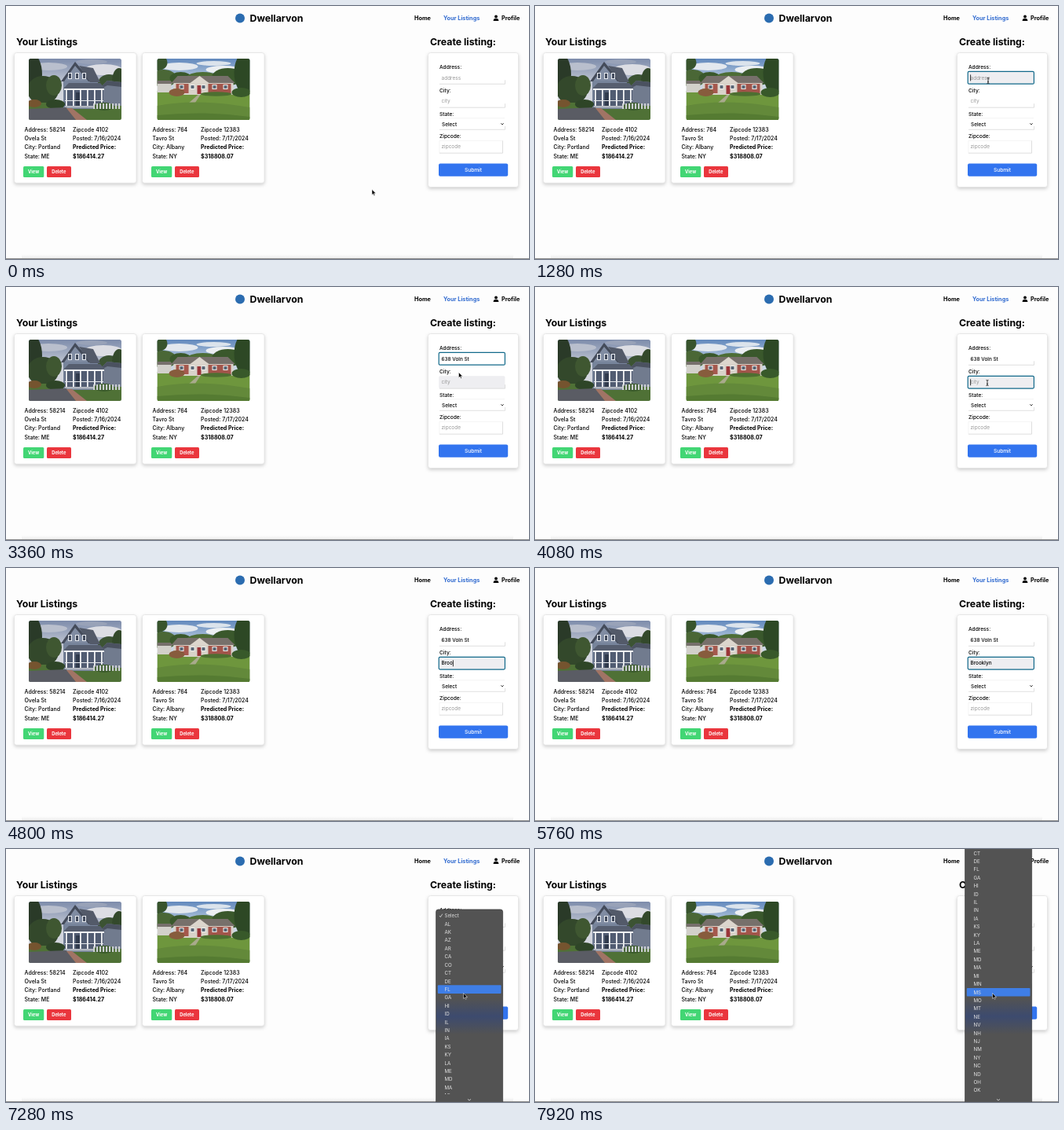
Recreate the animation shown at these times as an HTML page. Size 666x322 px, loop 8000 ms.

```html
<!DOCTYPE html>
<html lang="en">
<head>
<meta charset="utf-8">
<title>Property listings</title>
<style>
html, body { margin: 0; width: 100%; height: 100%; overflow: hidden; background: #fdfdfd; }
svg { display: block; width: 666px; height: 322px; font-family: Inter, Roboto, sans-serif; }
text { white-space: pre; }
.title { font-size: 12.3px; font-weight: 700; }
.nav { font-size: 7.3px; font-weight: 700; }
.body { font-size: 7px; font-weight: 500; }
.bold { font-size: 7.1px; font-weight: 700; }
.btn { font-size: 5.8px; font-weight: 700; fill: #fff; text-anchor: middle; }
.form { font-size: 6.6px; font-weight: 500; }
.field { font-size: 6.4px; font-weight: 500; }
.hint { font-size: 6.5px; fill: #999; }
.menu { font-size: 6.2px; fill: #e2e2e2; }
.card { fill: #fff; stroke: #e2e2e2; stroke-width: .8; filter: drop-shadow(0 2px 2px #0000002e); }
</style>
</head>
<body>
<svg viewBox="0 0 666 322">
  <defs>
    <clipPath id="frame"><rect width="118" height="78" rx="2.5"/></clipPath>
    <clipPath id="listClip"><rect x="547" width="86" height="312"/></clipPath>
    <linearGradient id="fade" x2="0" y2="1">
      <stop offset="0" stop-color="#000" stop-opacity="0"/>
      <stop offset="1" stop-color="#000" stop-opacity=".06"/>
    </linearGradient>
    <linearGradient id="tint" x2="0" y2="1">
      <stop offset="0" stop-color="#33477a" stop-opacity="0"/>
      <stop offset=".5" stop-color="#33477a" stop-opacity=".7"/>
      <stop offset="1" stop-color="#33477a" stop-opacity="0"/>
    </linearGradient>
    <linearGradient id="sky1" x2="0" y2="1">
      <stop offset="0" stop-color="#7d8cab"/><stop offset=".5" stop-color="#d3d6de"/>
    </linearGradient>
    <linearGradient id="sky2" x2="0" y2="1">
      <stop offset="0" stop-color="#6289bd"/><stop offset=".4" stop-color="#c9d6e4"/>
    </linearGradient>
  </defs>

  <rect width="666" height="322" fill="#fdfdfd"/>
  <rect x="20" y="316" width="626" height="5" fill="url(#fade)"/>
  <rect y="321" width="666" height="1" fill="#8c8c8c"/>

  <circle cx="298" cy="15.5" r="6" fill="#2b6cb0"/>
  <text class="title" x="310.5" y="19.8">Dwellarvon</text>
  <text class="nav" x="520" y="18">Home</text>
  <text class="nav" x="557" y="18" fill="#316bd0">Your Listings</text>
  <circle cx="624" cy="13.5" r="1.9"/>
  <path d="M620.7 19v-.8q0-2.2 2.2-2.2h2.2q2.2 0 2.2 2.2v.8z"/>
  <text class="nav" x="631" y="18">Profile</text>
  <text class="title" x="13" y="49.7">Your Listings</text>
  <text class="title" x="540" y="49.7">Create listing:</text>

  <g id="cards"></g>

  <rect class="card" x="537.5" y="59.5" width="115" height="171" rx="3"/>
  <g class="form">
    <text x="552" y="80.4">Address:</text>
    <text x="552" y="110.3">City:</text>
    <text x="552" y="139.9">State:</text>
    <text x="552" y="168">Zipcode:</text>
  </g>
  <g id="fields"></g>
  <path d="M552 157.3H635.5V153" fill="none" stroke="#d4d4d4" stroke-width=".7"/>
  <path d="M552 142.7H635" stroke="#ececec" stroke-width=".6"/>
  <text class="field" x="555" y="152.5">Select</text>
  <path d="M630.3 149.3l1.7 1.7 1.7-1.7" fill="none" stroke="#222" stroke-width=".9"/>
  <path d="M552 187.2V171.4H632" fill="none" stroke="#ececec" stroke-width=".6"/>
  <path d="M552 187.2H632.5V171.4" fill="none" stroke="#d0d0d0" stroke-width=".7"/>
  <text class="hint" x="554.5" y="181.3">zipcode</text>
  <rect x="551" y="200.5" width="88.2" height="16.2" rx="2" fill="#3274ef"/>
  <text class="form" x="595" y="211.1" fill="#fff" text-anchor="middle">Submit</text>

  <g id="menu">
    <path id="panel" fill="#535353" stroke="#3a3a3a" stroke-width=".7"/>
    <rect x="548" y="190" width="84.5" height="46" fill="url(#tint)"/>
    <rect id="mark" x="549.8" width="80.7" height="10.6" rx="1" fill="#3f7ee6"/>
    <g clip-path="url(#listClip)"><g id="list" class="menu"></g></g>
    <path d="M588 318.3l2 1.8 2-1.8" fill="none" stroke="#e2e2e2" stroke-width=".8"/>
  </g>

  <path id="arrow" d="M0 0V6.9L1.6 5.4 2.7 7.9 3.8 7.4 2.8 5H5z" fill="#000" stroke="#fff" stroke-width=".5"/>
  <path id="beam" d="M-1.5-3.6Q0-3.6 0-2.6V2.6Q0 3.6-1.5 3.6M1.5-3.6Q0-3.6 0-2.6M0 2.6Q0 3.6 1.5 3.6M-.9 1.3H.9" fill="none" stroke="#111" stroke-width=".8"/>
</svg>

<script>
const $ = id => document.getElementById(id);
const show = (el, on) => el.setAttribute('visibility', on ? 'visible' : 'hidden');
const clamp = v => Math.max(0, Math.min(1, v));
const ease = v => (v = clamp(v), v * v * (3 - 2 * v));

const row = (n, f) => Array.from({ length: n }, (_, i) => f(i)).join('');
const blob = (x, y, rx, ry, c) => `<ellipse cx="${x}" cy="${y}" rx="${rx}" ry="${ry}" fill="${c}"/>`;
const box = (x, y, w, h, c) => `<rect x="${x}" y="${y}" width="${w}" height="${h}" fill="${c}"/>`;
const shape = (d, c) => `<path d="${d}" fill="${c}"/>`;

const greyHouse = box(0, 0, 118, 78, 'url(#sky1)')
  + blob(25, 10, 24, 5, '#b9bfcd') + blob(95, 14, 24, 7, '#dcdde3') + blob(80, 4, 20, 3, '#98a2b8')
  + blob(4, 20, 13, 26, '#2a3a28') + blob(18, 40, 20, 18, '#33482b') + blob(32, 34, 10, 13, '#3f5731')
  + blob(102, 32, 14, 12, '#3c5333') + blob(115, 28, 9, 16, '#33492b')
  + box(0, 56, 118, 22, '#4f7136')
  + shape('M88 40L100 28 118 30V60H88z', '#717b8e') + shape('M88 40L100 28 118 30V36L100 34z', '#4b5260')
  + box(44, 26, 44, 38, '#77849b') + shape('M43 28L59 5 78 28z', '#808ca2')
  + shape('M59 4L80 29H76L59 9 45 29H41z', '#444b5a') + shape('M64 9L82 12 91 30H78z', '#535a69')
  + row(3, i => box(50 + i * 9, 18, 5, 8, '#e8ebf0') + box(51 + i * 9, 19, 3, 6, '#424b5d'))
  + shape('M44 38L51 31H91L97 38z', '#565e6f') + box(45, 38, 51, 2, '#eef0f3')
  + box(46, 40, 49, 20, '#515c72') + row(6, i => box(47 + i * 9, 39, 1.8, 22, '#f1f2f4'))
  + box(60, 43, 5, 17, '#303a4d') + box(46, 53, 49, 1, '#e4e7eb') + box(46, 60, 50, 2.5, '#b2b7c0')
  + blob(7, 57, 9, 5, '#75542f') + blob(34, 58, 12, 6, '#2e4527') + blob(96, 61, 13, 5, '#3a5a2a')
  + row(9, i => box(82 + i * 4, 57, 2.2, 7, '#ccd0d2'))
  + shape('M0 64L48 62 60 78H0z', '#5a5c64') + shape('M48 63H55L74 78H60z', '#a17465');

const redHouse = box(0, 0, 118, 78, 'url(#sky2)')
  + blob(28, 10, 24, 5, '#e3e8ee') + blob(72, 6, 22, 3, '#dbe3ec') + blob(84, 14, 22, 5, '#eceff2')
  + blob(8, 25, 17, 11, '#4a6736') + blob(30, 25, 14, 8, '#3a582c') + blob(58, 24, 20, 7, '#4d6d36')
  + blob(90, 23, 20, 11, '#3a582c') + blob(112, 18, 14, 26, '#2d4825') + blob(2, 5, 11, 10, '#38542d')
  + box(0, 41, 118, 37, '#6e963d')
  + box(0, 31, 18, 12, '#d2d0ca') + shape('M0 28H17L20 32H0z', '#77706c')
  + box(21, 29, 76, 17, '#d9d3ca') + shape('M18 31L26 22H90L99 31z', '#77706b')
  + shape('M42 31L54 22 66 31z', '#dcd6cd') + box(24, 32, 16, 12, '#a5584d') + box(65, 32, 29, 12, '#a2554b')
  + box(51, 34, 5, 11, '#9a3538') + row(5, i => box(28 + i * 14, 33, 6, 6, '#efefec') + box(29 + i * 14, 34, 4, 4, '#596675'))
  + blob(25, 43, 10, 5, '#875c3d') + blob(75, 45, 20, 2.8, '#4d6f31') + blob(107, 43, 12, 6, '#38592a')
  + shape('M52 46H55L34 78H16z', '#a9aa8c') + shape('M0 60Q50 50 118 62V78H0z', '#63893a')
  + shape('M0 72Q60 66 118 74V78H0z', '#557b32');

function card(x, px, photo, left, right) {
  const col = (cx, lines) => lines.map((s, i) =>
    `<text class="body ${cx > 60 && i > 1 ? 'bold' : ''}" x="${cx}" y="${159.6 + i * 11.4}">${s}</text>`).join('');
  return `<g transform="translate(${x})">
    <rect class="card" x="10.5" y="59.5" width="155.5" height="165.8" rx="3"/>
    <g transform="translate(${px} 67)" clip-path="url(#frame)">${photo}</g>
    ${col(23.5, left)}${col(85, right)}
    <rect x="22" y="204" width="26.3" height="14" rx="1.5" fill="#42d674"/><text class="btn" x="35" y="213.1">View</text>
    <rect x="52" y="204" width="31" height="14" rx="1.5" fill="#ea363d"/><text class="btn" x="67.3" y="213.1">Delete</text>
  </g>`;
}
$('cards').innerHTML =
  card(0, 29, greyHouse, ['Address: 58214', 'Ovela St', 'City: Portland', 'State: ME'],
    ['Zipcode 4102', 'Posted: 7/16/2024', 'Predicted Price:', '$186414.27']) +
  card(163, 29.5, redHouse, ['Address: 764', 'Tavro St', 'City: Albany', 'State: NY'],
    ['Zipcode 12383', 'Posted: 7/17/2024', 'Predicted Price:', '$318808.07']);

// Typed fields: focus from/to, first key and key interval in ms
const fields = [
  { y: 83.4, hint: 'address', value: '638 Voln St', from: 1040, to: 3600, key: 1480, gap: 135 },
  { y: 113.3, hint: 'city', value: 'Brooklyn', from: 3600, to: 6320, key: 4360, gap: 125 }
];
$('fields').innerHTML = fields.map(f => `<g>
  <rect x="551.2" y="${f.y}" width="84.2" height="15.8" rx="1.5"/>
  <path d="M552 ${f.y + 15.9}H635.5V${f.y + 11}" fill="none" stroke="#d0d0d0" stroke-width=".7"/>
  <text x="554.5" y="${f.y + 10.1}"></text>
  <rect y="${f.y + 4}" width=".8" height="8"/></g>`).join('');
fields.forEach((f, i) => [f.bg, f.line, f.text, f.caret] = $('fields').children[i].children);

const states = ('Select AL AK AZ AR CA CO CT DE FL GA HI ID IL IN IA KS KY LA ME MD MA MI MN MS MO ' +
  'MT NE NV NH NJ NM NY NC ND OH OK OR PA RI SC SD').split(' ');
const step = 10.41, top0 = 151;
$('list').innerHTML = '<path d="M552 0l1.3 1.7 2.5-4" transform="translate(0 151)" fill="none" stroke="#e2e2e2" stroke-width=".8"/>' +
  states.map((s, i) => `<text x="558.5" y="${top0 + 2.3 + i * step}">${s}</text>`).join('');

// Pointer stops: time, x, y
const path = [[0, 466, 233.5], [160, 466, 233.5], [880, 577, 95], [3200, 577, 95], [3520, 576, 122],
  [6000, 576, 122], [6240, 583, 151], [6440, 583, 151], [6720, 582.5, 183.5], [8000, 582.5, 183.5]];
function pointer(t) {
  const i = path.findIndex(p => p[0] > t), a = path[i - 1], b = path[i];
  const k = ease((t - a[0]) / (b[0] - a[0]));
  return [a[1] + (b[1] - a[1]) * k, a[2] + (b[2] - a[2]) * k];
}

function draw(t) {
  const [x, y] = pointer(t), open = t >= 6320;
  let beam = false, typing = false;

  for (const f of fields) {
    const n = Math.max(0, Math.min(f.value.length, Math.floor((t - f.key) / f.gap) + 1));
    const focus = t >= f.from && t < f.to;
    const near = x > 551 && y > f.y - 6 && y < f.y + 16;
    if (near && y > f.y) beam = true;
    if (t >= f.key && t < f.to - 400) typing = true;
    f.bg.setAttribute('fill', near && !open ? '#eeeef1' : '#fff');
    f.bg.setAttribute('stroke', focus ? '#12698a' : 'none');
    f.bg.setAttribute('stroke-width', 1.2);
    show(f.line, !focus);
    f.text.setAttribute('class', n ? 'field' : 'hint');
    f.text.textContent = n ? f.value.slice(0, n) : f.hint;
    const last = n ? f.key + (n - 1) * f.gap : f.from;
    show(f.caret, focus && (t - last) % 1000 < 500);
    f.caret.setAttribute('x', 554.3 + (n ? f.text.getComputedTextLength() + .3 : 0));
  }
  if (t >= 3120 && t < 4360 || t >= 6000) typing = false;

  const scroll = 21 * step * ease((t - 6960) / 880);
  const top = Math.max(-4, 143 - scroll);
  $('menu').setAttribute('display', open ? 'inline' : 'none');
  $('panel').setAttribute('d', `M547.6 323V${top + 3}q0-3 3-3h79q3 0 3 3V323z`);
  $('list').setAttribute('transform', `translate(0 ${-scroll})`);
  const first = top0 - scroll;
  const hover = Math.round((y - 1.5 - first) / step);
  $('mark').setAttribute('y', first + hover * step - 5.3);

  for (const id of ['arrow', 'beam']) {
    $(id).setAttribute('transform', `translate(${x} ${y})`);
    show($(id), !typing && (id === 'beam') === (beam && !open));
  }
}

function tick() {
  draw(performance.now() % 8000);
  requestAnimationFrame(tick);
}
tick();
</script>
</body>
</html>
```
